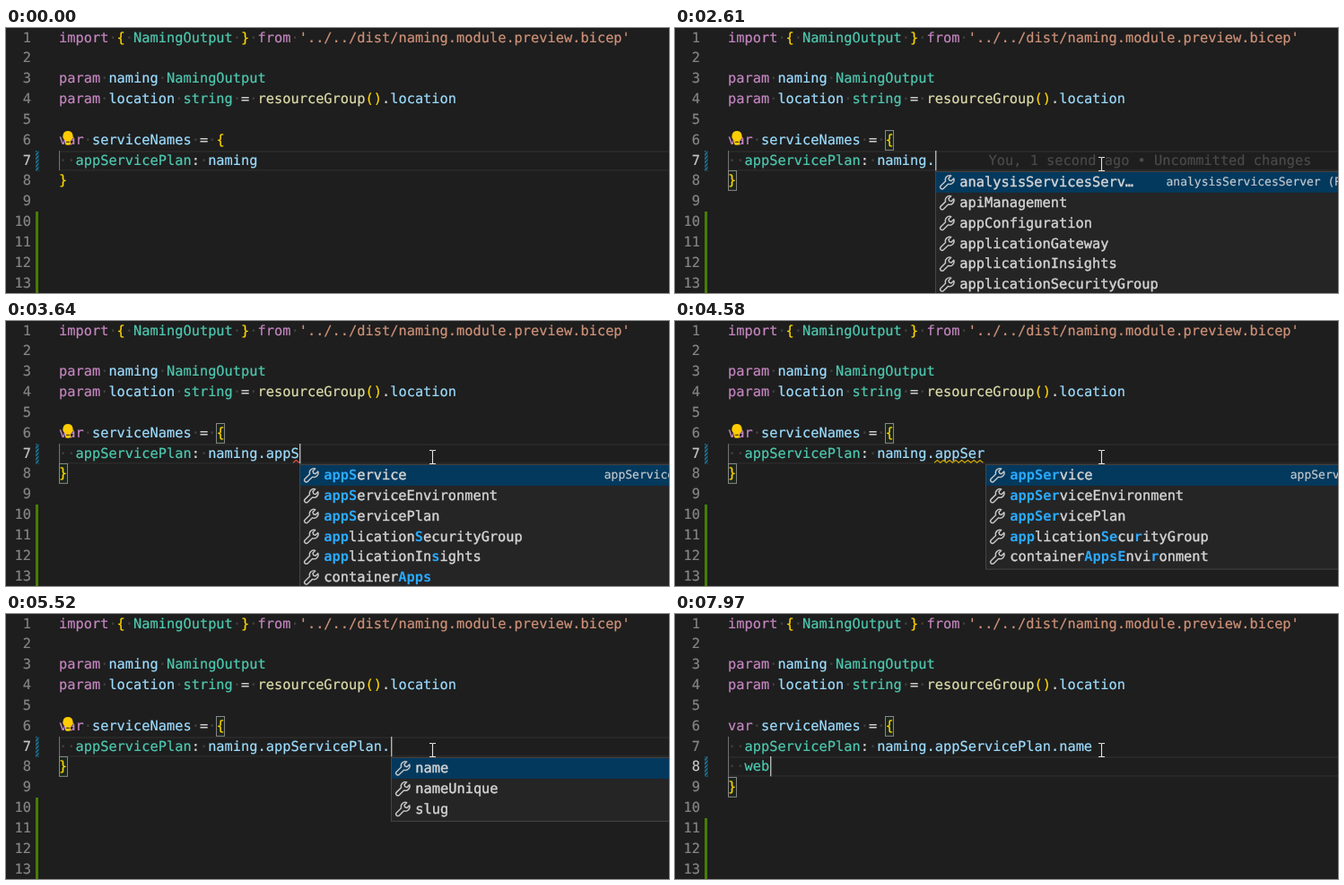
Write an HTML page that moves like this. It is 739x296 px and loops after 8 s.

```html
<!DOCTYPE html>
<html lang="en">
<head>
<meta charset="utf-8">
<title>Editor completion</title>
<style>
html, body { margin: 0; width: 100%; height: 100%; overflow: hidden; background: #1e1e1e; }
svg { display: block; width: 100%; height: 100%; }
text {
  font: 15.33px "DejaVu Sans Mono", monospace;
  font-variant-ligatures: none;
  text-rendering: geometricPrecision;
  white-space: pre;
  color: #d4d4d4;
}
text, tspan { fill: currentColor; stroke: currentColor; stroke-width: .2px; }
.k { color: #c586c0; }
.y { color: #ffd700; }
.t { color: #4ec9b0; }
.s { color: #ce9178; }
.v { color: #9cdcfe; }
.f { color: #dcdcaa; }
.dot { color: #424242; }
.num { color: #858585; text-anchor: end; }
.num.on { color: #c6c6c6; }
.blame { color: #4a4a4a; }
.item { stroke-width: .4px; }
.hit { color: #2aaaff; font-weight: bold; stroke: none; }
.detail { font-size: 13px; color: #c0c8ce; }
</style>
</head>
<body>
<svg viewBox="0 0 739 296" preserveAspectRatio="none">
  <defs>
    <pattern id="hatch" width="3" height="3" patternUnits="userSpaceOnUse" patternTransform="rotate(-45)">
      <rect width="3" height="1.6" fill="#1b81a8"/>
    </pattern>
    <path id="wrench" transform="scale(1.12)" fill="none" stroke="#c5c5c5" stroke-width="1.3" stroke-linejoin="round"
      d="M14.5 4.2 12 6.7 10 6 9.3 4 11.8 1.5A4.3 4.3 0 0 0 6.3 6.9L1.6 11.6a1.9 1.9 0 0 0 2.7 2.7L9 9.7A4.3 4.3 0 0 0 14.5 4.2z"/>
    <path id="ibeam" fill="none" stroke="#e4e4e4" stroke-width="1.1"
      d="M-3.5 -7.5H-1Q0 -7.5 0 -6.5Q0 -7.5 1 -7.5H3.5M0 -6.5V6.5M-3.5 7.5H-1Q0 7.5 0 6.5Q0 7.5 1 7.5H3.5"/>
  </defs>
  <g id="stage"></g>
</svg>
<script>
const LOOP = 8000, CHAR = 9.23, LINE = 22.84, LEFT = 59;
const stage = document.getElementById('stage');
const lineTop = line => Math.floor((line - 1) * LINE);
const colX = col => LEFT + col * CHAR;

const HEAD = [
  "k~import y~{ t~NamingOutput y~} k~from s~'../../dist/naming.module.preview.bicep'",
  '',
  'k~param v~naming t~NamingOutput',
  'k~param v~location t~string w~= f~resourceGroup`y~()`w~.`v~location',
  '',
  'k~var v~serviceNames w~= y~{'
];

const TYPED = [
  [0, ''], [2110, '.'], [3170, '.a'], [3310, '.ap'], [3440, '.app'], [3640, '.appS'],
  [3910, '.appSe'], [4040, '.appSer'], [5310, '.appServicePlan'],
  [5450, '.appServicePlan.'], [6170, '.appServicePlan.name']
];
const NEXT = [[0, ''], [7510, 'w'], [7650, 'we'], [7840, 'web']];

const list = s => s.split(' ');
const POPUP = [
  [0, null],
  [2210, list('analysisServicesServer apiManagement appConfiguration applicationGateway applicationInsights applicationSecurityGroup')],
  [3170, list('*a*nalysisServicesServer *a*piManagement *a*ppConfiguration *a*pplicationGateway *a*pplicationInsights *a*pplicationSecurityGroup')],
  [3310, list('*ap*iManagement *ap*pConfiguration *ap*plicationGateway *ap*plicationInsights *ap*plicationSecurityGroup *ap*pService')],
  [3440, list('*app*Configuration *app*licationGateway *app*licationInsights *app*licationSecurityGroup *app*Service *app*ServiceEnvironment')],
  [3640, list('*appS*ervice *appS*erviceEnvironment *appS*ervicePlan *app*lication*S*ecurityGroup *app*licationIn*s*ights container*Apps*')],
  [3910, list('*appSe*rvice *appSe*rviceEnvironment *appSe*rvicePlan *app*lication*Se*curityGroup container*AppsE*nvironment')],
  [4040, list('*appSer*vice *appSer*viceEnvironment *appSer*vicePlan *app*lication*Se*cu*r*ityGroup container*AppsE*nvi*r*onment')],
  [5310, null],
  [5520, list('name nameUnique slug')],
  [6170, null]
];
const SELECTED = [[0, 0], [4710, 1], [5050, 2], [5310, 0]];
const CARET = [
  [0, 0], [940, 1], [1540, 0], [2010, 1], [2680, 0], [3170, 1], [4580, 0], [5110, 1],
  [5970, 0], [6170, 1], [7310, 0], [7510, 1]
];
const BLAME = [[0, 0], [2610, 1], [3170, 0]];
// [colour, first x, last x]
const SQUIGGLE = [
  [0, null], [3640, ['#f14c4c', 320, 327]], [3710, ['#cca700', 289, 327]],
  [4310, ['#cca700', 289, 345]], [5450, null]
];
const GUTTER = [[0, ['hatch', 7]], [6370, ['removed', 8]], [6710, ['removed', 9]], [7110, ['hatch', 8]]];

const at = (track, t) => track.findLast(([start]) => start <= t)[1];
const rect = (x, y, w, h, fill, extra = '') =>
  `<rect x="${x}" y="${y}" width="${w}" height="${h}" fill="${fill}" ${extra}/>`;
const text = (x, y, body, cls = '') => `<text x="${x}" y="${y}" class="${cls}">${body}</text>`;
const span = (cls, body) => `<tspan class="${cls}">${body}</tspan>`;

// "k~word" colours a word, a backtick joins words, a space shows as a dot.
const colour = src => src.split(' ').map(word =>
  word.split('`').map(part => part && span(...part.split('~'))).join('')
).join(span('dot', '·'));

const bracketBox = (col, line) =>
  rect(Math.floor(colX(col)) + 0.5, lineTop(line) + 0.5, CHAR - 0.2, LINE - 1, '#1b251b', 'stroke="#888"');

function gutter(t, firstAdded) {
  const [kind, line] = at(GUTTER, t), y = lineTop(line);
  const mark = kind === 'hatch'
    ? rect(33, y, 3.5, LINE, 'url(#hatch)')
    : `<path d="M33 ${y - 4.5}l4.5 4.5-4.5 4.5z" fill="#94151b"/>`;
  return mark + rect(33, lineTop(firstAdded), 3, 100, '#487e02');
}

function squiggle([stroke, from, to]) {
  let d = `M${from} 158.2`;
  for (let x = from + 3.4, up = true; x <= to; x += 3.4, up = !up) d += `L${x} ${up ? 155.6 : 158.2}`;
  return `<path d="${d}" fill="none" stroke="${stroke}" stroke-width="1.2"/>`;
}

function popup(items, left, selected) {
  let out = rect(left + 0.5, 160.4, 510, items.length * LINE + 2.6, '#252526', 'stroke="#454545"');
  items.forEach((item, i) => {
    const y = 161 + i * LINE, name = item.replaceAll('*', ''), on = i === selected;
    const label = on && name.length > 21 ? item.slice(0, -2) + '…' : item;
    if (on) {
      const detail = name + ' (Required)';
      out += rect(left + 1, y, 509, LINE, '#04395e')
        + text(left + Math.max(257.5, 504 - detail.length * 7.82), y + 15, detail, 'detail');
    }
    out += `<use href="#wrench" transform="translate(${left + 4.5} ${y + 2.3})"/>`
      + text(left + 27.3, y + 16, label.split('*').map((s, n) => span(n % 2 ? 'hit' : 'item', s)).join(''));
  });
  return out;
}

const BULB = `<path fill="#ffcc00" d="M69 115a5.7 5.7 0 0 1 3 10.5V129q0 1.7-1.7 1.7h-2.6q-1.7 0-1.7-1.7v-3.5A5.7 5.7 0 0 1 69 115z"/>
  <path d="M67 127.3h4" stroke="#1e1e1e"/>`;

function mouse(t) {
  if (t < 70) return '';
  let x, y;
  if (t < 1140) {
    const p = Math.min(1, Math.floor((t - 70) / 66.6) / 12), q = 1 - p;
    x = q * q * 733 + 2 * p * q * 420 + p * p * 357;
    y = q * q * 288 + 2 * p * q * 10 + p * p * 158;
  } else {
    const p = Math.min(1, (Math.floor((t - 1140) / 66.6) + 1) / 4), e = p * p * (3 - 2 * p);
    x = 357 + 118 * e;
    y = 158 - 6 * e;
  }
  return `<use href="#ibeam" transform="translate(${x + 0.5} ${y})"/>`;
}

function draw(t) {
  const broken = t >= 6710, active = broken ? 8 : 7, close = active + 1;
  const typed = at(TYPED, t), next = at(NEXT, t), items = at(POPUP, t), wave = at(SQUIGGLE, t);
  const caretX = Math.ceil(colX(broken ? 2 + next.length : 24 + typed.length));
  const indent = span('dot', '··');

  const code = HEAD.map(colour);
  code.push(indent + colour('t~appServicePlan`w~: v~naming') + span('v', typed));
  if (broken) code.push(indent + span('t', next));
  code.push(span('y', '}'));

  let out = rect(60, lineTop(active) + 1, 700, LINE - 2, 'none', 'stroke="#282828" stroke-width="2"')
    + rect(LEFT, lineTop(7), 1, lineTop(close) - lineTop(7), '#707070')
    + gutter(t, close + 2);
  if (t >= 940) out += bracketBox(19, 6) + bracketBox(0, close);
  for (let n = 1; n <= 13; n++) out += text(28, lineTop(n) + 16, n, n === active ? 'num on' : 'num');
  code.forEach((body, i) => out += text(LEFT, lineTop(i + 1) + 16, body));
  if (t < 7040) out += BULB;
  if (at(BLAME, t)) out += text(349.5, lineTop(7) + 16, 'You, 1 second ago • Uncommitted changes', 'blame');
  if (wave) out += squiggle(wave);
  if (at(CARET, t)) out += rect(caretX, lineTop(active), 1.4, LINE - 0.5, '#b4b5b3');
  if (items) out += popup(items, caretX, at(SELECTED, t));
  return out + mouse(t);
}

const start = performance.now();
let shown = '';
function frame() {
  const markup = draw((performance.now() - start) % LOOP);
  if (markup !== shown) stage.innerHTML = shown = markup;
  requestAnimationFrame(frame);
}
frame();
</script>
</body>
</html>
```
